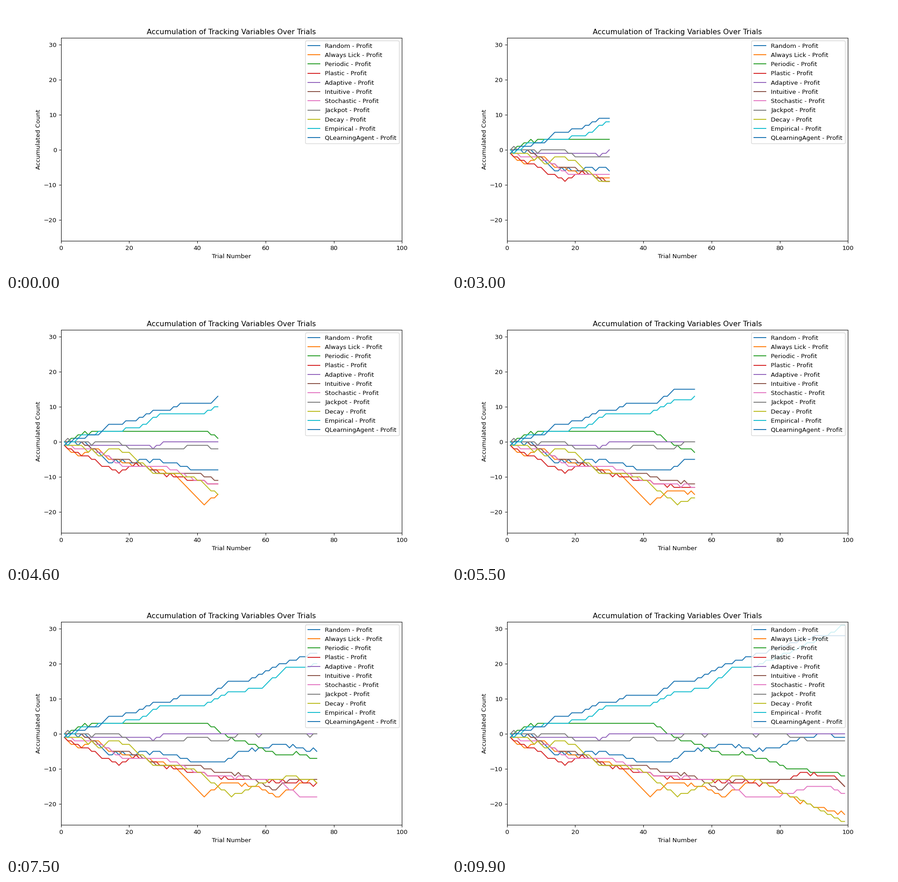
A matplotlib script for the animation above (10000 ms loop, 966 by 580 pixels).

```python
import numpy as np
import matplotlib.pyplot as plt
from matplotlib.animation import FuncAnimation

W, H, DPI = 966, 580, 96.6
TRIALS = 100

plt.rcParams["font.family"] = "DejaVu Sans"
# The small margin keeps the pixel size from rounding down
fig, ax = plt.subplots(figsize=((W + 0.01) / DPI, (H + 0.01) / DPI), dpi=DPI)
rng = np.random.default_rng(4)
trials = np.arange(1, TRIALS)
agents = []


def walk(points, wobble):
    """Follow the trend, winning or losing at most one per trial."""
    trend = np.interp(trials, *zip(*points))
    profit = points[0][1]
    steps = []
    for aim in trend + rng.normal(0, wobble, trials.size):
        profit += np.clip(np.rint(aim - profit), -1, 1)
        steps.append(profit)
    return steps


def agent(name, *points, wobble=0.22):
    line, = ax.plot([], [], label=f"{name} - Profit")
    agents.append((line, walk(points, wobble)))


# Trend of each agent as (trial, profit) turning points
agent("Random", (1, -1), (7, 0), (14, -6), (29, -5), (40, -8), (48, -8),
      (53, -5), (66, -3), (73, -5), (92, 0), (99, -1))
agent("Always Lick", (1, -1), (5, -4), (10, -2), (14, -5), (33, -9),
      (42, -18), (47, -14), (58, -15), (64, -18), (73, -13), (85, -19),
      (99, -23))
agent("Periodic", (1, 0), (9, 3), (42, 3), (49, -1), (64, -6), (72, -6),
      (84, -10), (99, -12))
agent("Plastic", (1, -1), (17, -9), (22, -6), (29, -9), (49, -13),
      (78, -14), (87, -11), (96, -12), (99, -15))
agent("Adaptive", (1, 0), (6, 0), (7, -1), (25, -1), (27, -2), (30, 0),
      (99, 0), wobble=0)
agent("Intuitive", (1, 0), (6, 0), (15, -5), (19, -5), (29, -9), (41, -9),
      (45, -11), (55, -12), (62, -16), (67, -13), (97, -13), (99, -15))
agent("Stochastic", (1, -1), (12, -3), (18, -7), (31, -7), (43, -12),
      (64, -13), (70, -18), (79, -18), (90, -15), (95, -15), (99, -17),
      wobble=0.1)
agent("Jackpot", (1, 0), (17, 0), (21, -2), (36, -2), (38, -1), (49, -2),
      (52, 0), (80, 0), (89, -2), (99, -2))
agent("Decay", (1, -1), (5, -1), (12, -4), (15, -2), (20, -3), (27, -9),
      (34, -9), (41, -11), (49, -17), (53, -17), (58, -14), (68, -12),
      (76, -14), (99, -25))
agent("Empirical", (1, 0), (2, -1), (6, 2), (23, 4), (29, 8), (41, 8),
      (49, 12), (59, 13), (66, 19), (72, 19), (94, 28), (98, 31), wobble=0)
agent("QLearningAgent", (1, -1), (4, 1), (11, 2), (14, 5), (22, 6), (27, 9),
      (32, 9), (35, 11), (44, 11), (49, 15), (54, 15), (65, 20), (84, 26),
      (91, 28), (99, 28), wobble=0)

ax.set_xlim(0, TRIALS)
ax.set_ylim(-26, 32)
ax.set_xlabel("Trial Number")
ax.set_ylabel("Accumulated Count")
ax.set_title("Accumulation of Tracking Variables Over Trials", fontsize=11.95)
ax.legend(loc="upper right", labelspacing=0.54)


def update(n):
    for line, profit in agents:
        line.set_data(trials[:n], profit[:n])
    return [line for line, _ in agents]


anim = FuncAnimation(fig, update, frames=TRIALS, interval=100,
                     repeat=True, repeat_delay=0)
plt.show()
```
